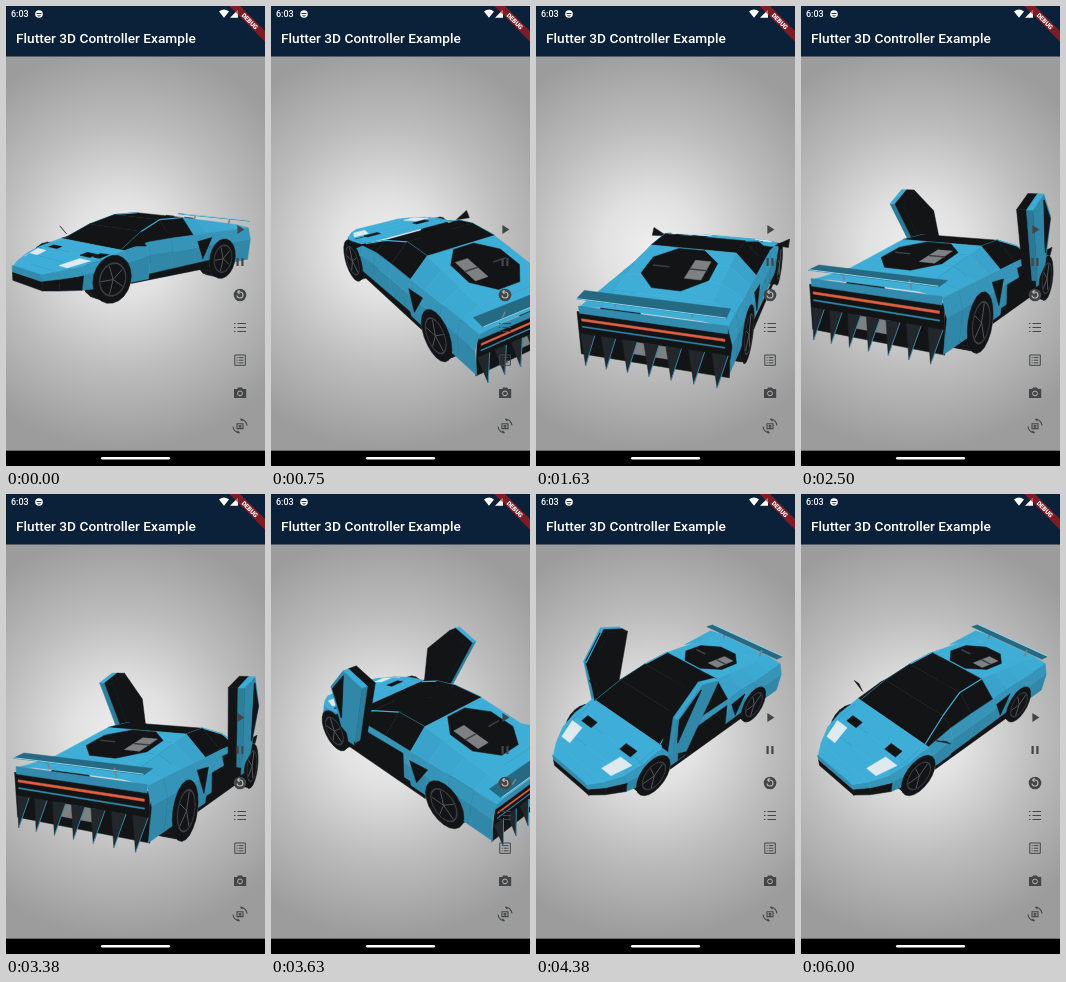
Animation, 259 px wide and 460 px high, one loop 6260 ms. Source, as an HTML page:

```html
<!DOCTYPE html>
<html lang="en">
<head>
<meta charset="utf-8">
<title>3D controller demo</title>
<style>
html, body { margin: 0; width: 100%; height: 100%; overflow: hidden; background: #000; }
svg { display: block; width: 100vw; height: 100vh; }
text { font-family: Roboto, Inter, sans-serif; fill: #fff; }
</style>
</head>
<body>
<svg viewBox="0 0 259 460">
  <defs>
    <radialGradient id="room" gradientUnits="userSpaceOnUse" cx="116" cy="242" r="202">
      <stop offset="0" stop-color="#eee"/><stop offset=".25" stop-color="#e1e1e1"/>
      <stop offset=".6" stop-color="#bdbdbd"/><stop offset="1" stop-color="#9c9c9c"/>
    </radialGradient>
    <clipPath id="view"><rect y="50" width="259" height="395"/></clipPath>
  </defs>
  <rect y="50" width="259" height="395" fill="url(#room)"/>
  <g id="car" clip-path="url(#view)" stroke-linejoin="round"></g>

  <g fill="#434547" stroke="#434547" stroke-width="0">
    <path d="M231.4 219v9l7-4.500z"/>
    <path d="M230.500 251.900h2.200v8.200h-2.200zM235.300 251.900h2.200v8.200h-2.200z"/>
    <circle cx="234" cy="289" r="6.300"/>
    <path d="M231 289.500a3 3 0 1 0 3-3.500h-2m1.500-1.800l-1.800 1.800l1.800 1.800" fill="none" stroke="#b8b8b8" stroke-width="1.200"/>
    <path d="M228 317.500h1.500m2 0h8.500M228 321.500h1.500m2 0h8.500M228 325.500h1.500m2 0h8.500" stroke-width="1.200"/>
    <path d="M228.800 349h10.500v10.300h-10.500zM230.700 351.600h1m1 0h4.700M230.700 354.200h1m1 0h4.700M230.700 356.800h1m1 0h4.700" fill="none"
      stroke-width="1"/>
    <path d="M228 383h3l1.300-1.600h3.600l1.300 1.600h3v9h-12.200z"/>
    <circle cx="234" cy="387.400" r="2.400" fill="none" stroke="#b5b5b5" stroke-width="1"/>
    <g fill="none" stroke-width="1.100">
      <path d="M234.500 413a7 7 0 0 1 6.500 6.500M233.500 427a7 7 0 0 1-6.500-6.500M234.500 413l2 2M233.500 427l-2-2M231 417.800h6v4.800h-6z"/>
      <circle cx="234" cy="420.200" r="1"/>
    </g>
  </g>

  <rect width="259" height="50.500" fill="#0b2039"/>
  <text x="5" y="11.300" font-size="9" font-weight="500">6:03</text>
  <circle cx="33" cy="8" r="3.800" fill="#fff"/>
  <path d="M30.500 7.500h5M31.500 9.500q1.500 1.200 3 0" stroke="#0b2039" stroke-width=".9" fill="none"/>
  <path d="M213 5.500q5-4 10 0l-5 6.300zM224 11.800h8v-8z" fill="#fff"/>
  <text x="10" y="37.300" font-size="13.700" font-weight="500">Flutter 3D Controller Example</text>
  <g transform="translate(259) rotate(45)">
    <rect x="-25.200" y="17.600" width="50.400" height="7.600" fill="#b71c1c" opacity=".66"/>
    <text y="23.700" font-size="6.300" font-weight="900" text-anchor="middle">DEBUG</text>
  </g>
  <rect y="444.700" width="259" height="15.300"/>
  <rect x="95" y="451" width="69" height="2.400" rx="1.200" fill="#fff"/>
</svg>
<script>
const LOOP = 6260, STEP = 125, FOCAL = 500;
const BLUE = [62, 174, 216], INK = [18, 20, 22], STEEL = [125, 129, 132], PALE = [222, 234, 240], RED = [224, 96, 66];
const MIDDLE = [0, 0, .4], TAIL = -2.3, NOSE = 2.4, SILL = .15;
const svgCar = document.getElementById('car');

const clamp = v => Math.max(0, Math.min(1, v));
const mix = (a, b, u) => a + (b - a) * u;
const ramp = (v, a, b) => clamp((v - a) / (b - a));
const minus = (a, b) => a.map((v, i) => v - b[i]);
const dot = (a, b) => a.reduce((sum, v, i) => sum + v * b[i], 0);
const cross = (a, b) => [a[1] * b[2] - a[2] * b[1], a[2] * b[0] - a[0] * b[2], a[0] * b[1] - a[1] * b[0]];
const mean = points => [0, 1, 2].map(i => points.reduce((sum, p) => sum + p[i], 0) / points.length);
const ring = (count, make) => Array.from({ length: count }, (_, i) => make(i * 2 * Math.PI / count));

// Body shape in metres: x forward, y right, z up.
const shoulder = x => .82 - .42 * ramp(x, .4, NOSE) ** 1.3;
const roof = x => x > 0 ? mix(1.13, shoulder(x), ramp(x, 0, 1.1)) : mix(1.13, .86, ramp(x, -.6, TAIL));
const width = x => 1 - .5 * ramp(x, 1.5, NOSE) ** 2;
const inner = x => mix(.66, .88, ramp(x, 0, 1.1));
const section = (x, side) => {
  const w = width(x) * side, z = shoulder(x);
  return [[x, w * inner(x), roof(x)], [x, w * .96, z], [x, w * 1.02, mix(z, SILL, .35)], [x, w * .97, SILL]];
};
const onTop = (x, f, side) =>
  [x, f * width(x) * side, mix(roof(x), shoulder(x), ramp(f, inner(x), .96)) + .015];
const stations = [TAIL, -1.9, -1.45, -1, -.6, 0, .55, 1.1, 1.55, 1.9, 2.2, NOSE];

function drawCar([yaw, pitch, size, cx, cy], doorAngle) {
  const rad = Math.PI / 180, sa = Math.sin(yaw * rad), ca = Math.cos(yaw * rad);
  const sb = Math.sin(pitch * rad), cb = Math.cos(pitch * rad);
  const eye = [-ca * cb, sa * cb, sb].map(v => v * FOCAL / size);
  const items = [];

  const depth = ([x, y, z]) => (x * ca - y * sa) * cb - (z - .5) * sb;
  const project = p => {
    const [x, y, z] = p, k = size / (1 + depth(p) * size / FOCAL);
    return `${(cx + k * (x * sa + y * ca)).toFixed(1)},${(cy - k * ((x * ca - y * sa) * sb + (z - .5) * cb)).toFixed(1)}`;
  };
  const add = (points, bias, markup) =>
    items.push([depth(mean(points)) - bias, `${markup} points="${points.map(project).join(' ')}"/>`]);
  const line = (color, thick, points, bias = .5) =>
    add(points, bias, `<polyline fill="none" stroke="rgb(${color})" stroke-width="${thick}"`);

  // Faces turned away from the eye are dropped; without a core a face is seen from both sides.
  function face(color, points, bias = 0, core = MIDDLE) {
    const at = mean(points);
    let normal = cross(minus(points[1], points[0]), minus(points[2], points[0]));
    if (core) {
      if (dot(normal, minus(at, core)) < 0) normal = normal.map(v => -v);
      if (dot(normal, minus(eye, at)) <= 0) return;
    }
    const light = color === BLUE ? .8 + .2 * normal[2] / Math.hypot(...normal) : 1;
    const fill = `rgb(${color.map(v => Math.round(v * light))})`;
    add(points, bias, `<polygon fill="${fill}" stroke="${fill}" stroke-width=".5"`);
  }
  function prism(color, near, far, bias) {
    const core = mean([...near, ...far]);
    face(color, near, bias, core);
    face(color, far, bias, core);
    near.forEach((p, i) => {
      const j = (i + 1) % near.length;
      face(color, [p, near[j], far[j], far[i]], bias, core);
    });
  }
  const across = (color, x, half, low, high, bias) =>
    face(color, [[x, -half, low], [x, half, low], [x, half, high], [x, -half, high]], bias);
  const onSide = (color, side, points, bias = .4) => face(color, points.map(([x, z]) => [x, 1.03 * side, z]), bias);
  const patch = (color, side, x0, x1, f0, f1) =>
    face(color, [onTop(x0, f0, side), onTop(x0, f1, side), onTop(x1, f1, side), onTop(x1, f0, side)], .45);

  function shell() {
    for (let i = 1; i < stations.length; i++) {
      const [a, b] = [stations[i - 1], stations[i]], middle = (a + b) / 2;
      const cabin = middle > -.6 && middle < 1.1;
      const [left, right] = [-1, 1].map(side => [section(a, side), section(b, side)]);
      face(cabin ? INK : BLUE, [left[0][0], left[1][0], right[1][0], right[0][0]]);
      for (const [back, front] of [left, right])
        for (let row = 0; row < 3; row++) {
          const dark = row === 0 ? cabin : row === 2 && middle > 2;
          face(dark ? INK : BLUE, [back[row], front[row], front[row + 1], back[row + 1]]);
        }
    }
  }

  function ends() {
    across(INK, TAIL, .99, SILL, .76, .1);
    across(BLUE, TAIL, .96, .74, .84, .2);
    across(RED, TAIL - .01, .93, .64, .67, .5);
    across(BLUE, TAIL - .01, .93, .55, .565, .5);
    across(STEEL, TAIL - .01, .27, .28, .45, .5);
    across(INK, NOSE, .5, SILL, .3, .2);
    across(BLUE, NOSE, .5, .3, .41, .2);
    if (ca > 0) for (let i = -3; i <= 3; i++) {
      const y = i * .29, blade = [[TAIL, y - .1, .45], [TAIL - .12, y, .06], [TAIL, y + .1, .45]];
      face([34, 39, 43], blade, .7, null);
      line(BLUE, .7, blade.slice(1), .8);
    }
  }

  function engine() {
    face(INK, ring(8, a => [-1.2 + .6 * Math.cos(a + .39), .52 * Math.sin(a + .39), roof(-1.2 + .6 * Math.cos(a + .39)) + .01]), .4);
    for (const side of [-1, 1]) {
      patch(STEEL, side, -.95, -1.45, .15, .38);
      line([60, 64, 67], 1.5, [onTop(-1.2, .15, side), onTop(-1.2, .4, side)], .6);
    }
  }

  function wheel(x, side) {
    const circle = (r, y) => ring(20, a => [x + r * Math.cos(a), y * side, .28 + r * Math.sin(a)]);
    prism(INK, circle(.38, 1), circle(.38, .7), -.6);
    if (eye[1] * side < 1) return;
    face(INK, circle(.4, 1.03), .5);
    face([64, 68, 72], circle(.28, 1.04), .55);
    face(INK, circle(.255, 1.04), .6);
    const hub = [x, 1.04 * side, .28];
    circle(.25, 1.04).filter((_, i) => i % 4 === 0).forEach(tip => line([88, 92, 96], .9, [hub, tip], .7));
  }

  function door(side) {
    if (doorAngle <= 0) return;
    const s = Math.sin(doorAngle * rad), c = Math.cos(doorAngle * rad);
    const swing = (outline, y) => outline.map(([x, z]) => {
      const dx = x - .85, dz = z - .5, up = dz * c - dx * s;
      return [.85 + dx * c + dz * s, side * (y + .15 * s * Math.max(0, up)), .5 + up];
    });
    const outline = [[.85, .3], [.85, .7], [.1, 1.05], [-.55, .8], [-.6, .35]];
    const pane = [[.6, .72], [.1, 1], [-.45, .78]];
    const bias = side * eye[1] > 0 ? .6 : 0;
    onSide(INK, side, [[.8, .25], [.8, .72], [-.5, .76], [-.5, .25]]);
    prism(INK, swing(outline, .85), swing(outline, 1), bias);
    prism(BLUE, swing(outline, 1), swing(outline, 1.1), bias);
    prism(INK, swing(pane, 1.1), swing(pane, 1.11), bias + .1);
  }

  function sideDetails(side) {
    onSide(INK, side, [[1, SILL], [1, .24], [-1, .3], [-1, SILL]]);
    onSide(INK, side, [[-.65, .7], [-1.05, .74], [-.8, .35]]);
    patch(PALE, side, 2.05, 1.7, .55, .85);
    patch(INK, side, 1.6, 1.45, .4, .68);
    line(BLUE, 1.2, [1.1, .55, 0, -.6].map(x => section(x, side)[0]), .3);
    face(INK, [[.95, side, .78], [.95, side * 1.24, .92], [.85, side * 1.24, .8]], .2, null);
    line(STEEL, 1.5, [[-2.2, side * .5, .84], [-2.25, side * .5, .97]]);
  }

  shell();
  ends();
  engine();
  for (const side of [-1, 1]) {
    sideDetails(side);
    door(side);
    for (const axle of [-1.4, 1.4]) wheel(axle, side);
  }
  face(BLUE, [[-2.15, -.95, .99], [-2.35, -.95, .96], [-2.35, .95, .96], [-2.15, .95, .99]], .6, null);
  line([140, 210, 232], 1, [[-2.36, -.95, .97], [-2.36, .95, .97]], .7);

  return items.sort((a, b) => b[0] - a[0]).map(item => item[1]).join('');
}

const views = [
  { time: 0, camera: [-131, 9.5, 51, 130, 243] },
  { time: 1125, camera: [0, 35, 60, 184, 265] },
  { time: 2000, camera: [27, 13, 62, 158, 270] },
  { time: 3375, camera: [27, 13, 62, 158, 270] },
  { time: 3875, camera: [-115, 53, 52, 157, 201] },
  { time: 4375, camera: [-135, 38, 51, 133, 210] }
];
function cameraAt(time) {
  const next = views.findIndex(view => view.time > time);
  if (next < 0) return views[views.length - 1].camera;
  const from = views[next - 1], to = views[next], u = ramp(time, from.time, to.time);
  return from.camera.map((v, i) => mix(v, to.camera[i], u * u * (3 - 2 * u)));
}
const doorsAt = time => 65 * (1 - (1 - ramp(time, 1625, 3025)) ** 2) * (1 - ramp(time, 4375, 4750));

let shown = -1;
function update(now) {
  const time = Math.min(6000, Math.floor((now % LOOP + 5) / STEP) * STEP);
  if (time !== shown) svgCar.innerHTML = drawCar(cameraAt(time), doorsAt(time));
  shown = time;
  requestAnimationFrame(update);
}
update(performance.now());
</script>
</body>
</html>
```
